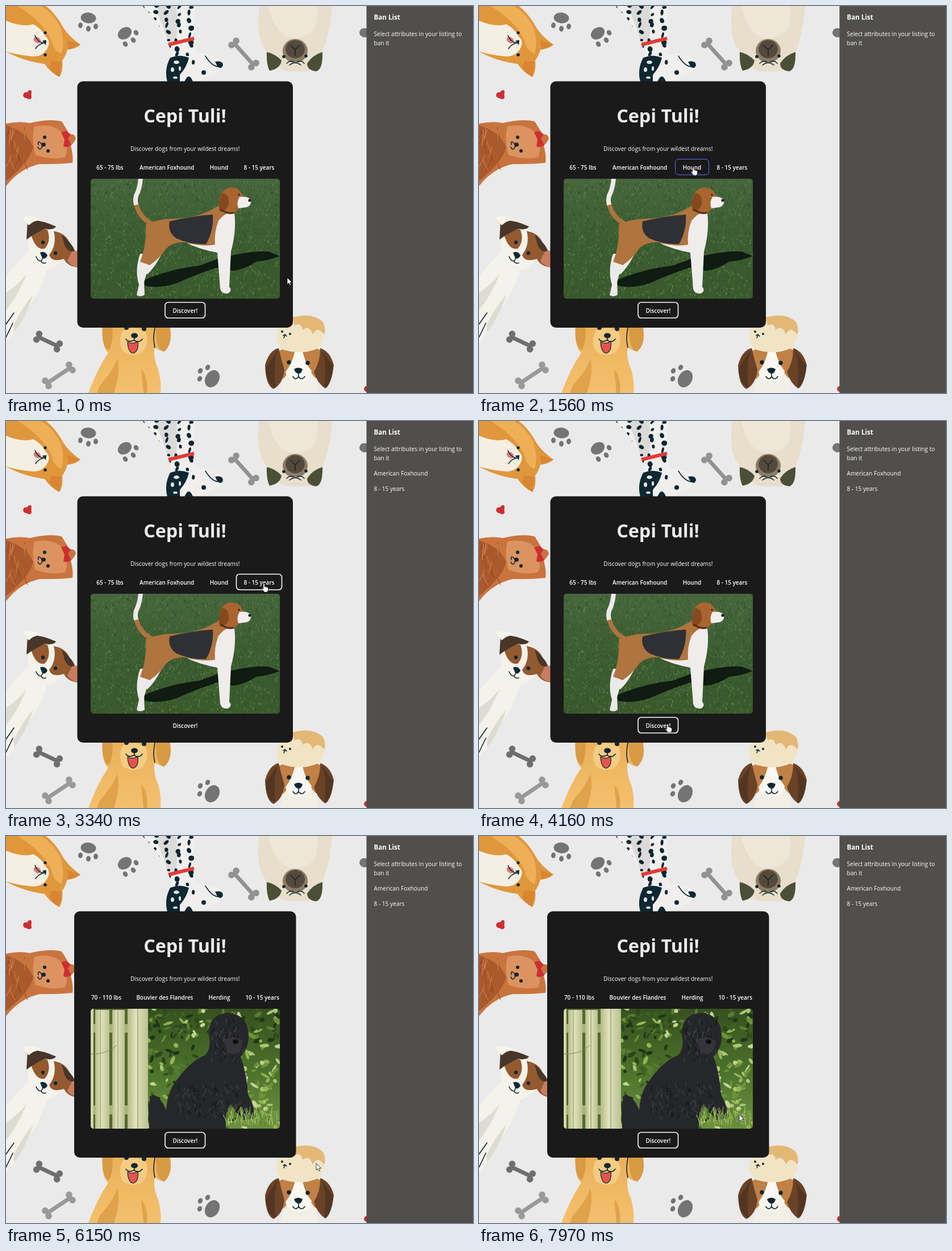
An HTML page for the animation above (8 s loop, 822x681 px).

```html
<!DOCTYPE html>
<html lang="en">
<head>
<meta charset="utf-8">
<title>Dog finder</title>
<style>
html, body { margin: 0; width: 100%; height: 100%; overflow: hidden; background: #eaeaea; }
svg { display: block; width: 822px; height: 681px; }
text { font: 10.15px "Open Sans", "Noto Sans", sans-serif; fill: #fff; }
.mid { text-anchor: middle; }
.chip { font-size: 9.95px; font-weight: 600; text-anchor: middle; }
.ink { fill: #0d2833; }
.line { fill: none; stroke: #0d2833; stroke-width: 1.6; stroke-linecap: round; }
.ring { fill: none; }
</style>
</head>
<body>
<svg viewBox="0 0 822 681">
<defs>
  <clipPath id="photoClip"><rect x="149" y="304" width="333" height="211" rx="5"/></clipPath>
  <clipPath id="spotClip"><path d="M240 0H333Q330 40 331 58Q333 75 336 85L290 95Q292 80 287 70Q270 30 250 10Z"/></clipPath>
  <linearGradient id="lawn" x2="0" y2="1"><stop stop-color="#47663e"/><stop offset=".5" stop-color="#3b5d31"/><stop offset="1" stop-color="#3a5a2d"/></linearGradient>
  <linearGradient id="wood" x2="0" y2="1"><stop stop-color="#36511f"/><stop offset=".5" stop-color="#4b702b"/><stop offset="1" stop-color="#6c9140"/></linearGradient>
  <linearGradient id="plank"><stop stop-color="#b3bb86"/><stop offset=".4" stop-color="#e2e3bf"/><stop offset="1" stop-color="#b9c18e"/></linearGradient>
  <linearGradient id="gold" x2="0" y2="1"><stop stop-color="#eab05a"/><stop offset="1" stop-color="#f4c06d"/></linearGradient>
</defs>
<rect width="822" height="681" fill="#eaeaea"/>
<g id="props"></g>

<!-- shiba -->
<path fill="#e0973c" d="M0 0H70Q84 10 97 31Q106 50 131 68Q122 76 108 77Q105 88 99 96Q101 115 94 125Q78 117 68 102Q30 97 0 80Z"/>
<path fill="#eeaf57" d="M20 0H62Q84 14 96 38Q104 62 98 84Q84 80 80 60Q62 24 20 0Z"/>
<path fill="#f4efe2" d="M0 26Q30 38 48 32Q63 40 70 54Q80 62 72 76Q62 92 40 88Q20 86 0 80Z"/>
<path fill="#d98532" d="M80 96L98 98L94 125Q82 118 76 108ZM108 60L131 68L110 76Z"/>
<ellipse cx="55" cy="60" rx="7" ry="5" fill="#d97a7c" transform="rotate(35 55 60)"/>
<path class="line" d="M51 52Q56 64 66 65M66 65Q56 68 52 75M66 65L70 64"/>
<path class="ink" d="M64 61L71 60L70 69Z"/><circle class="ink" cx="69" cy="47" r="2.6"/><circle class="ink" cx="69" cy="86" r="2.8"/>

<!-- dalmatian -->
<path fill="#f0efed" d="M240 0H333Q330 40 331 58Q333 75 336 85Q350 81 358 87Q379 90 382 104Q375 119 358 123Q345 130 341 133H285Q278 115 290 95Q292 80 287 70Q270 30 250 10Z"/>
<path fill="#dcdad8" d="M262 0H300Q304 40 298 66L287 70Q276 34 262 0Z"/>
<g id="spots" clip-path="url(#spotClip)" fill="#0c2530"></g>
<path class="ink" d="M289 91Q306 84 322 91Q318 108 306 121L306 133H284Q278 112 289 91ZM368 98Q381 95 382 104Q379 113 372 106Z"/>
<g fill="#e8ebe9"><ellipse cx="300" cy="99" rx="5" ry="3"/><ellipse cx="293" cy="112" rx="3" ry="4"/><ellipse cx="306" cy="110" rx="2" ry="4"/><ellipse cx="298" cy="126" rx="4" ry="2"/></g>
<path class="ink" d="M318 126Q324 120 329 133H314ZM328 95Q335 94 331 103Q325 104 328 95Z"/>
<circle class="ink" cx="348" cy="117" r="4"/><path class="line" stroke-width="1" d="M351 88Q362 106 374 107"/>
<path d="M286 68L331 57" stroke="#e43b35" stroke-width="6"/>

<!-- pug -->
<path fill="#e7decb" d="M446 0Q440 45 452 70Q460 82 468 88Q476 112 498 115H533Q546 104 556 82Q570 50 574 0Z"/>
<path fill="#eee7d8" d="M462 0Q468 35 490 52Q520 66 544 40Q550 18 548 0Z"/>
<path fill="#4b4f36" d="M459 81Q474 84 485 96Q483 110 464 114Q458 103 459 81ZM557 81Q540 86 530 101Q530 113 546 115Q558 112 557 81Z"/>
<ellipse cx="509" cy="79" rx="22" ry="21" fill="#8b7c66"/><ellipse cx="509" cy="76" rx="17" ry="16" fill="#55493b"/>
<path class="line" d="M501 69L509 77L517 69M509 77V87M499 104Q509 96 519 104M494 101Q500 95 506 98M513 98Q520 95 525 101" stroke-width="1.2"/>
<circle class="ink" cx="489" cy="89" r="2.8"/><circle class="ink" cx="528" cy="88" r="2.8"/>

<!-- yorkie -->
<path fill="#c9743e" d="M0 207Q24 202 42 206Q76 198 98 203Q106 216 112 226Q122 224 123 234Q120 240 114 246Q119 264 117 276Q85 279 60 278Q25 285 0 317Z"/>
<path fill="#a9592c" d="M0 210Q35 220 48 248Q42 274 0 308Z"/>
<path fill="#dc9360" d="M50 212Q84 206 100 224Q112 250 104 266Q82 272 52 262Q44 236 50 212Z"/>
<g id="hair" fill="none" stroke-width="1"></g>
<path fill="#cf2d32" d="M97 222L106 220L114 226L109 233L115 245Q108 250 101 247L103 235Z"/>
<circle class="ink" cx="68" cy="231" r="3"/><circle class="ink" cx="74" cy="255" r="3"/><ellipse class="ink" cx="66" cy="244" rx="4" ry="3.4"/>
<path class="line" d="M64 244Q55 234 57 244M64 246Q60 257 56 248" stroke-width="1.2"/>

<!-- terrier -->
<path fill="#f4f2ea" d="M0 476Q22 448 40 431Q35 412 45 398Q68 382 88 394Q112 410 103 442Q88 462 72 465Q62 500 40 530Q24 568 0 592Z"/>
<path fill="#dddcd3" d="M0 505Q22 490 36 472Q20 512 0 535ZM14 560Q30 528 48 508Q34 550 14 575Z"/>
<path fill="#94592f" d="M44 402Q58 387 73 394Q80 414 68 427Q52 430 44 402ZM84 396Q106 400 112 417Q126 430 126 460Q108 458 102 445Q80 452 76 438Q90 420 84 396Z"/>
<path fill="#473629" d="M38 378Q56 374 88 388Q84 395 68 392Q48 402 36 411Q37 394 38 378ZM98 402Q118 420 121 431Q110 436 103 420Z"/>
<path fill="#f7f4e9" d="M29 372Q46 366 62 376Q48 378 40 386Z"/><path fill="#c87d62" d="M116 432L126 430V460Q112 456 108 448Z"/>
<circle class="ink" cx="65" cy="416" r="3.2"/><circle class="ink" cx="87" cy="435" r="3.2"/><path class="ink" d="M60 434Q68 430 73 439Q70 446 64 444Z"/>
<path class="line" d="M65 443L62 449M53 441Q56 449 62 449Q64 454 70 452M0 583L12 558M0 560L14 540" stroke-width="1.3"/>

<!-- retriever -->
<path fill="url(#gold)" d="M145 681Q160 640 180 610Q168 602 170 560H288Q294 590 278 608Q267 606 262 600Q258 618 268 640Q274 662 272 681Z"/>
<path fill="#d99a45" d="M170 560H187Q190 590 181 606Q167 600 170 560ZM264 560H287Q296 592 279 608Q262 606 264 560Z"/>
<path fill="#f6cb83" d="M205 572Q226 560 246 574Q254 596 238 611Q222 618 206 608Q196 590 205 572Z"/>
<path fill="#e0a24a" d="M165 668Q190 640 196 620Q202 644 190 681H160ZM238 640Q250 650 248 681H242Z"/>
<path class="line" d="M262 566Q258 586 262 601" stroke="#5b4a20"/>
<path fill="#e55350" stroke="#0d2833" stroke-width="1.2" d="M214 591Q224 596 232 590Q234 608 224 611Q215 610 214 591Z"/>
<path class="line" d="M211 586Q216 593 225 588Q234 594 240 586M226 582V588"/><ellipse class="ink" cx="226" cy="580" rx="6" ry="4.5"/>
<circle class="ink" cx="212" cy="566" r="4"/><circle class="ink" cx="243" cy="568" r="4"/>

<!-- beagle and friend -->
<path fill="#f1efe6" d="M482 681Q494 650 490 610H544Q542 650 550 681Z"/>
<path fill="#c18045" d="M478 608Q514 590 556 606Q560 636 545 655Q530 640 521 606H509Q504 640 488 656Q472 630 478 608Z"/>
<path fill="#6a4227" d="M480 602Q463 606 456 632Q457 668 471 674Q488 664 490 640Q484 620 480 602ZM553 602Q571 608 577 632Q572 668 562 673Q548 664 542 644Q554 624 553 602Z"/>
<path fill="#3f2c20" d="M478 606Q470 630 474 672Q458 664 457 636ZM556 606Q566 630 560 672Q575 664 576 634Z" opacity=".55"/>
<path fill="#faf8f1" d="M510 600H521Q524 626 538 642Q536 660 515 661Q495 660 492 644Q506 626 510 600Z"/>
<circle class="ink" cx="498" cy="627" r="3.7"/><circle class="ink" cx="531" cy="628" r="3.7"/><path class="ink" d="M507 639Q515 634 522 639Q520 647 515 647Q509 646 507 639Z"/>
<path class="line" d="M515 647V652M505 652Q510 660 515 652Q520 660 526 652"/>
<path fill="#f0e4c5" d="M476 578Q480 554 510 546Q540 541 558 558Q566 584 550 602Q522 615 488 605Q474 596 476 578Z"/>
<path fill="#e3b877" d="M504 548Q540 538 558 556Q564 570 560 578Q548 562 540 578Q534 560 522 570Q520 556 508 562Z"/>
<circle class="ink" cx="486" cy="573" r="2"/><circle class="ink" cx="500" cy="577" r="2"/><path class="line" d="M488 580L491 578L494 581M491 580L489 584" stroke-width="1"/>

<rect x="634.5" width="188" height="681" fill="#504f4d"/>
<text x="647.5" y="24" style="font-size:11.6px;font-weight:700">Ban List</text>
<text x="647.5" y="53">Select attributes in your listing to</text>
<text x="647.5" y="69">ban it</text>
<text id="ban1" x="647.5" y="95.5">American Foxhound</text>
<text id="ban2" x="647.5" y="122.5">8 - 15 years</text>

<rect id="card" y="132.5" height="433.5" rx="10" fill="#1a1a1a"/>
<text class="mid" x="315" y="204.5" style="font-size:32.3px;font-weight:700;fill:#ececea">Cepi Tuli!</text>
<text class="mid" x="315.3" y="255">Discover dogs from your wildest dreams!</text>
<g id="chips"></g>
<text class="chip" x="315.3" y="540">Discover!</text>

<g clip-path="url(#photoClip)">
 <g id="photo0">
  <rect x="149" y="304" width="333" height="211" fill="url(#lawn)"/>
  <g id="grass" fill="none"></g>
  <path fill="#101b12" d="M244 482Q290 462 340 457L376 444Q430 430 462 432L482 440Q462 448 440 450Q424 462 400 466L372 460Q330 474 300 488Q270 498 244 492Z"/>
  <path fill="none" stroke="#b0733f" stroke-width="8" d="M229 347Q234 374 262 386"/>
  <path fill="none" stroke="#eceae8" stroke-width="8" d="M237 302Q236 320 229 334Q227 342 229 350"/>
  <path fill="#eceae9" d="M236 436L258 436Q248 468 243 486L244 508Q238 513 230 509L234 490Q226 466 236 436ZM258 440L277 430Q264 458 249 472L244 470Z"/>
  <path fill="#b0743e" d="M246 384Q270 374 300 374Q345 372 376 350L400 360Q404 395 396 420L372 432Q340 426 318 416Q290 414 278 432Q268 446 253 456L236 450Q248 420 246 384Z"/>
  <path fill="#2e3035" d="M288 379Q330 369 364 367Q366 395 352 419Q325 420 300 409Q284 398 288 379Z"/>
  <path fill="#efecec" d="M374 378Q388 360 402 365Q406 395 396 432L393 494Q399 502 390 506Q380 507 377 498L372 434Q340 428 318 417Q350 424 368 420Q366 398 374 378Z"/>
  <path fill="#a9652f" d="M375 342Q378 322 396 319Q412 320 417 334L412 354Q400 370 390 365Q376 362 375 342Z"/>
  <path fill="#f2eeee" d="M411 336Q424 334 431 341Q433 350 424 354L409 356Q405 346 411 336Z"/>
  <path fill="#86491f" d="M380 329Q394 330 392 350Q386 363 376 361Q372 345 380 329Z"/>
  <path fill="none" stroke="#5a2c18" stroke-width="3" d="M378 358Q388 366 401 364"/>
  <circle cx="429" cy="342" r="2.6" fill="#1d1a1a"/><circle cx="410" cy="332" r="1.5" fill="#1d1a1a"/>
 </g>
 <g id="photo1">
  <rect x="149" y="304" width="333" height="211" fill="url(#wood)"/>
  <g id="leaves"></g>
  <rect x="149" y="304" width="101" height="211" fill="#56672f"/>
  <path fill="#a9b377" d="M149 331H250V346H149ZM149 474H250V490H149Z"/>
  <g fill="url(#plank)"><rect x="149" y="304" width="5" height="211"/><rect x="157" y="306" width="25" height="209"/><rect x="187" y="306" width="22" height="209"/><rect x="214" y="304" width="36" height="211"/></g>
  <path fill="none" stroke="#7e8a51" d="M166 306V515M197 306V515M232 304V515M149 384Q180 384 195 368"/>
  <path fill="#26272a" d="M357 350Q355 315 390 311Q425 313 427 350Q428 372 413 388Q424 420 426 455Q440 480 436 497L414 500Q405 482 395 472Q388 500 386 515H252Q248 470 257 455Q272 458 282 482Q284 450 300 430Q325 395 352 385Q362 370 357 350Z"/>
  <g id="curls" fill="none"></g>
  <path fill="#34343a" d="M384 358Q400 350 416 360Q417 380 402 384Q386 382 384 358Z"/>
  <ellipse cx="404" cy="362" rx="5" ry="4" fill="#0d0d10"/>
  <g id="blades" fill="none"></g>
 </g>
</g>

<rect id="focus" class="ring" rx="5.5" stroke="#fff" stroke-width="1.6"/>
<rect id="hover" class="ring" rx="5.5" stroke="#646cff" stroke-width="1"/>
<g id="cursor" stroke="#111" stroke-width=".8" stroke-linejoin="round" fill="#fff">
  <path id="arrow" d="M0 0V12L2.8 9.4 4.6 13.6 6.6 12.7 4.8 8.7H8.6Z"/>
  <path id="hand" d="M-1.3 1Q0-.7 1.3 1V5.6Q3 4.8 3.8 6.2Q5.4 5.4 6 7Q7.6 6.4 7.6 8.4V11Q7.4 15 4.6 15.2H1.6Q0 14.8-1 13L-4 9.3Q-3.6 7.6-1.3 9.2Z"/>
</g>
</svg>
<script>
const $ = id => document.getElementById(id);
const LOOP = 8000, SWAP = 6150;

let seed = 7;
const rnd = (a = 0, b = 1) => {
  seed = (seed * 16807) % 2147483647;
  return a + (b - a) * seed / 2147483647;
};
const pick = list => list[Math.floor(rnd(0, list.length))];

function add(parent, tag, attrs, text) {
  const el = document.createElementNS('http://www.w3.org/2000/svg', tag);
  for (const k in attrs) el.setAttribute(k, attrs[k]);
  if (text) el.textContent = text;
  return parent.appendChild(el);
}

function oval(parent, cx, cy, rx, ry, turn, fill) {
  add(parent, 'ellipse', { cx, cy, rx, ry, fill, transform: `rotate(${turn} ${cx} ${cy})` });
}

// Short curved strokes scattered over a box, one path per colour.
function strokes(id, colors, count, [x, y, w, h], dx, dy, width = 1) {
  for (const stroke of colors) {
    let d = '';
    for (let i = 0; i < count; i++) {
      const u = rnd(-dx, dx);
      d += `M${rnd(x, x + w).toFixed(1)} ${rnd(y, y + h).toFixed(1)}q${(u / 3).toFixed(1)} ${(dy / 2).toFixed(1)} ${u.toFixed(1)} ${dy}`;
    }
    add($(id), 'path', { d, stroke, 'stroke-width': width });
  }
}

function paw(x, y, rx, ry, turn, toes) {
  oval($('props'), x, y, rx, ry, turn, '#747474');
  for (const [tx, ty] of toes) oval($('props'), tx, ty, 4, 5, turn, '#747474');
}

function bone(x1, y1, x2, y2, color) {
  const len = Math.hypot(x2 - x1, y2 - y1), nx = (y1 - y2) / len * 5.5, ny = (x2 - x1) / len * 5.5;
  add($('props'), 'path', { d: `M${x1} ${y1}L${x2} ${y2}`, stroke: color, 'stroke-width': 7 });
  for (const [x, y] of [[x1, y1], [x2, y2]])
    for (const s of [-1, 1]) oval($('props'), x + s * nx, y + s * ny, 5.8, 5.8, 0, color);
}

function heart(x, y) {
  add($('props'), 'path', {
    d: 'M-8 1Q-7-5-1-4Q4-11 7-6Q6 0 7 6Q3 10-2 6Q-7 6-8 1Z', fill: '#cf2d32', transform: `translate(${x} ${y})`
  });
}

paw(145, 21, 13.5, 9.5, 5, [[131, 34], [145, 40], [158, 36]]);
paw(209, 48, 13, 10, -35, [[229, 47], [224, 60], [210, 67]]);
paw(363, 656, 12, 16, 30, [[355, 636], [342, 642], [341, 656]]);
paw(631, 47, 9, 8, 10, []);
bone(401, 65, 436, 104, '#929292');
bone(56, 582, 92, 599, '#6e6e6e');
bone(72, 664, 114, 636, '#999');
heart(38, 156);
heart(638, 673);

for (let i = 0; i < 40; i++)
  oval($('spots'), 246 + i % 5 * 19 + rnd(-5, 5), Math.floor(i / 5) * 12 + rnd(-4, 4), rnd(2, 5), rnd(2.5, 5.5), rnd(0, 90));

strokes('hair', ['#8d4522', '#d98a55', '#b4622f'], 9, [2, 212, 32, 62], 10, 20);
strokes('grass', ['#2a4824', '#53753f', '#67864e', '#304f28'], 420, [149, 306, 333, 208], 3, 4);
strokes('grass', ['#86a069'], 90, [149, 400, 333, 110], 2, 3);
strokes('curls', ['#3c3d42', '#17181b'], 60, [302, 430, 112, 62], 6, 7, 1.4);
strokes('curls', ['#424349', '#17181b'], 30, [362, 320, 58, 70], 6, 8, 1.4);
strokes('blades', ['#a9c46a', '#55792f', '#8db052'], 45, [386, 490, 96, 22], 6, -14);

for (let i = 0; i < 330; i++) {
  const x = rnd(250, 482), y = rnd(304, 515);
  const light = x > 415 && y > 360 || rnd() < .3;
  oval($('leaves'), x, y, rnd(3, 9), rnd(1.5, 4), rnd(0, 180),
    pick(light ? ['#8fb552', '#a9c772', '#6d9339', '#c3d494'] : ['#2d471b', '#3f6024', '#577e30', '#203616']));
}

const sets = [
  [['65 - 75 lbs', 183], ['American Foxhound', 283.2], ['Hound', 375], ['8 - 15 years', 445.5]],
  [['70 - 110 lbs', 176.5], ['Bouvier des Flandres', 279.5], ['Herding', 375.5], ['10 - 15 years', 451.2]]
].map(row => {
  const g = add($('chips'), 'g', {});
  for (const [label, x] of row) add(g, 'text', { class: 'chip', x, y: 287.5 }, label);
  return g;
});

// Left, top, width of each button; all share one height.
const buttons = {
  breed: [221.5, 269.5, 123], group: [345.5, 269.5, 59], life: [405.5, 269.5, 80], go: [280, 521.5, 70.5]
};
const BTN_H = 27.5;

const clicks = [[0, 'go'], [2280, 'breed'], [3340, 'life'], [4160, 'go']];

// time, x, y of the pointer tip
const moves = [
  [0, 495, 478], [440, 489, 458], [560, 477, 425], [690, 463, 390], [810, 452, 355], [940, 445, 325],
  [1060, 442, 303], [1190, 440, 286], [1310, 425, 286], [1440, 396, 285], [1560, 377, 283], [1860, 346, 284],
  [2010, 300, 285], [2130, 262, 286], [2280, 246, 286], [2410, 239, 286], [2560, 350, 333], [2690, 395, 350],
  [2810, 425, 356], [2940, 440, 356], [3090, 452, 365], [3220, 455, 330], [3340, 454, 286], [3460, 458, 320],
  [3590, 460, 366], [3740, 412, 450], [3860, 359, 534], [4010, 342, 533], [4160, 332, 533], [4460, 503, 573],
  [4610, 546, 585], [4910, 546, 583], [5160, 546, 580], [5420, 546, 577], [5570, 546, 576], [6870, 555, 534],
  [7010, 558, 512], [7140, 555, 480], [7260, 539, 450], [7390, 515, 428], [7850, 486, 460], [7970, 458, 490]
];

const at = (steps, t) => steps.reduce((last, s) => s[0] <= t ? s : last);
const show = (el, on) => el.setAttribute('visibility', on ? 'visible' : 'hidden');

function frame(el, name) {
  const [x, y, width] = buttons[name];
  for (const [k, v] of Object.entries({ x, y, width, height: BTN_H })) el.setAttribute(k, v);
}

function render(t) {
  const [, x, y] = at(moves, t);
  const focused = at(clicks, t)[1];
  const over = Object.keys(buttons).find(k => {
    const [l, top, w] = buttons[k];
    return x >= l && x <= l + w && y >= top && y <= top + BTN_H;
  });
  $('cursor').setAttribute('transform', `translate(${x} ${y})`);
  show($('hand'), over);
  show($('arrow'), !over);
  frame($('focus'), focused);
  show($('hover'), over && over !== focused);
  if (over) frame($('hover'), over);

  const next = t >= SWAP;
  $('card').setAttribute('x', next ? 120 : 125.5);
  $('card').setAttribute('width', next ? 390.5 : 379.5);
  [sets, [$('photo0'), $('photo1')]].forEach(pair => pair.forEach((el, i) => show(el, next === !!i)));
  show($('ban1'), t >= clicks[1][0]);
  show($('ban2'), t >= clicks[2][0]);
}

function tick() {
  render(performance.now() % LOOP);
  requestAnimationFrame(tick);
}
tick();
</script>
</body>
</html>
```
